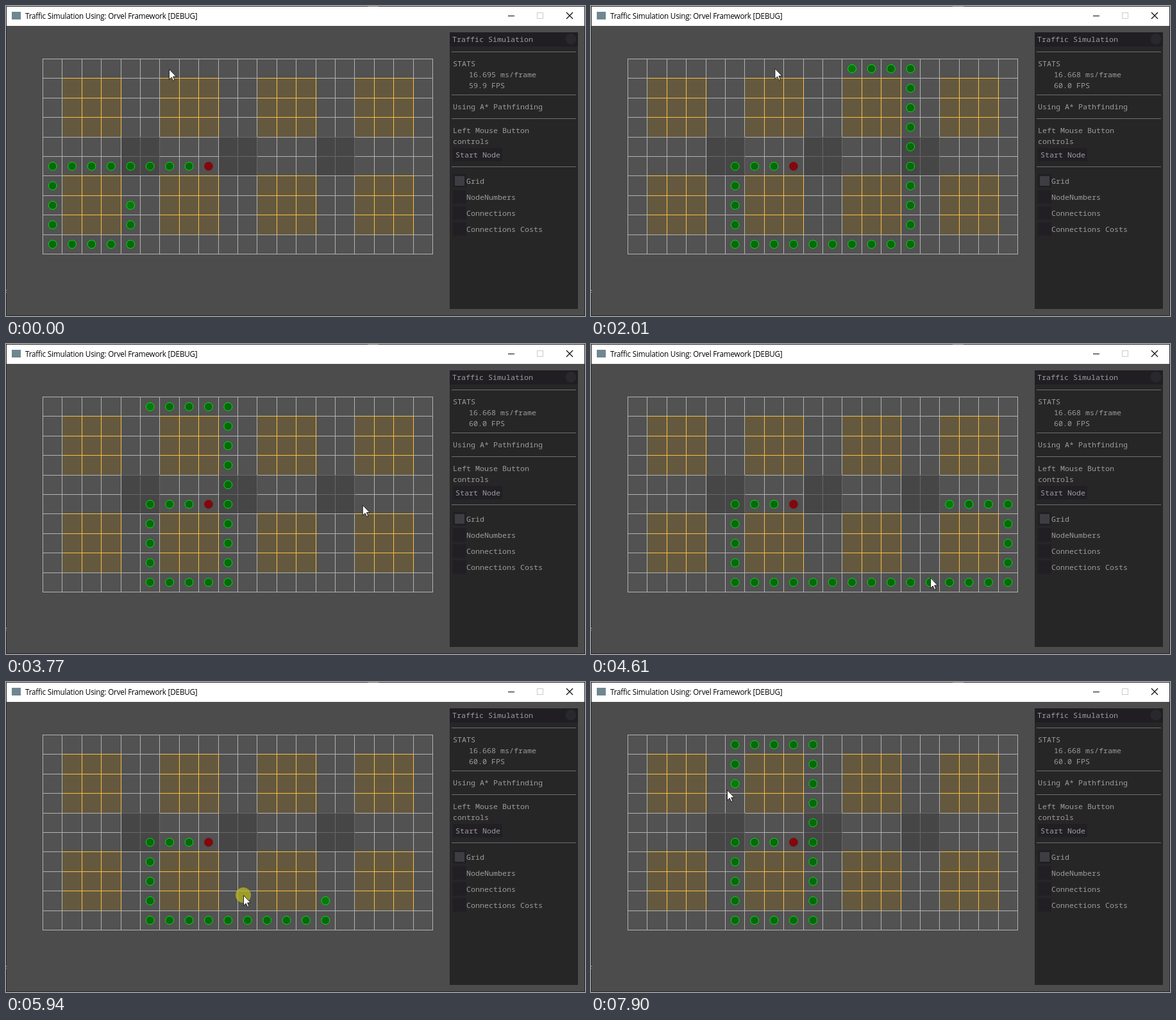
An HTML page that plays this animation: 903x483 px, repeating every 7970 ms.

```html
<!DOCTYPE html>
<html lang="en">
<head>
<meta charset="utf-8">
<title>Traffic Simulation</title>
<style>
  html, body { margin: 0; width: 100%; height: 100%; overflow: hidden; background: #4c4c4c; }
  svg { display: block; }
  .title { font: 11.7px "Open Sans", "Noto Sans", sans-serif; fill: #000; letter-spacing: -0.2px; }
  .ui { font: 11.67px "Noto Sans Mono", "DejaVu Sans Mono", monospace; fill: #9c9c9c; white-space: pre; }
  .crisp { shape-rendering: crispEdges; }
</style>
</head>
<body>
<svg id="stage" width="903" height="483" viewBox="0 0 903 483"></svg>
<script>
const LOOP = 7970, COLS = 20, ROWS = 10;
const PITCH = 30.4, LEFT = 57.5, TOP = 82.5;
const stage = document.getElementById('stage');

function add(tag, attrs, parent = stage) {
  const el = document.createElementNS('http://www.w3.org/2000/svg', tag);
  for (const key in attrs) el.setAttribute(key, attrs[key]);
  return parent.appendChild(el);
}
const box = (x, y, width, height, fill) => add('rect', { x, y, width, height, fill, class: 'crisp' });
function label(x, y, text, cls = 'ui') {
  const el = add('text', { x, y, class: cls });
  el.textContent = text;
  return el;
}
const show = (el, on) => el.setAttribute('visibility', on ? 'visible' : 'hidden');

function drawWindow() {
  box(0, 0, 903, 483, '#4c4c4c');
  box(0, 0, 903, 31, '#ffffff');
  box(0, 0, 903, 1, '#2a2a2a');
  box(564, 0, 17, 1, '#6a6250');
  box(0, 0, 1, 483, '#272727');
  box(902, 0, 1, 483, '#272727');
  box(0, 482, 903, 1, '#272727');
  box(0, 442, 1, 2, '#8c8c8c');
  box(0, 446, 1, 1, '#8c8c8c');
  box(9, 9, 14, 12, '#6f8790');
  label(30, 20, 'Traffic Simulation Using: Orvel Framework [DEBUG]', 'title');
  box(783, 15, 10, 1, '#000');
  add('rect', { x: 828.5, y: 10.5, width: 9, height: 9, fill: 'none', stroke: '#cccccc' });
  add('path', { d: 'M874 10l10 10m0-10l-10 10', stroke: '#000', 'stroke-width': 1.1 });
}

const KINDS = {
  road: ['#515251', '#b2b2b2'],
  block: ['#64593f', '#fabd48'],
  crossing: ['#464646', '#686868']
};
function kind(c, r) {
  if (c % 5 > 0 && c % 5 < 4 && r % 5 > 0 && r % 5 < 4) return 'block';
  return (r === 4 || r === 5) && c > 3 && c < 16 && c % 5 % 4 === 0 ? 'crossing' : 'road';
}

// Later cells cover the shared edges, so rows run down and columns run leftwards.
function drawGrid() {
  const lineX = c => Math.floor(LEFT + PITCH * c);
  const lineY = r => Math.floor(TOP + PITCH * r);
  for (let r = 0; r < ROWS; r++) {
    for (let c = COLS - 1; c >= 0; c--) {
      const x = lineX(c), y = lineY(r), [fill, stroke] = KINDS[kind(c, r)];
      add('rect', {
        x: x + .5, y: y + .5, width: lineX(c + 1) - x, height: lineY(r + 1) - y,
        fill, stroke, class: 'crisp'
      });
    }
  }
}

function drawPanel() {
  box(692, 41, 200, 431, '#262627');
  box(692, 41, 200, 22, '#201e23');
  add('circle', { cx: 881, cy: 51.5, r: 8.5, fill: '#29282c' });
  for (const y of [71, 138, 175, 250]) box(695, y, 194, 1, '#6e6e72');
  label(696, 56, 'Traffic Simulation');
  label(697, 94, 'STATS');
  label(697, 161, 'Using A* Pathfinding');
  label(697, 198, 'Left Mouse Button');
  label(697, 215, 'controls');
  box(697, 221, 77, 21, '#211f24');
  label(701, 236, 'Start Node');
  ['Grid', 'NodeNumbers', 'Connections', 'Connections Costs'].forEach((name, i) => {
    box(697, 262 + 25 * i, 21, 21, '#211f24');
    label(718, 277 + 25 * i, name);
  });
  box(700, 265, 15, 15, '#3e3d43');
}

// One-way lanes: every fifth column runs up, the one before it down;
// traffic circles clockwise until it reaches the goal in row 5.
function route(c, r) {
  const nodes = [[c, r]];
  function go(toC, toR) {
    while (c !== toC || r !== toR) {
      c += Math.sign(toC - c);
      r += Math.sign(toR - r);
      nodes.push([c, r]);
    }
  }
  const upLane = c % 5 === 0;
  if (!(upLane && c <= 5 && r > 5)) {
    if (upLane) go(c, r > 5 ? 5 : 0);
    go(c + 4 - c % 5, r);
    go(c, 9);
    go(c > 5 ? 5 : 0, 9);
  }
  go(c, 5);
  go(8, 5);
  return nodes;
}

function drawRoute(x, y) {
  const group = add('g', {});
  const nodes = route(Math.floor((x - LEFT) / PITCH), Math.floor((y - TOP) / PITCH));
  nodes.forEach(([c, r], i) => {
    const goal = i === nodes.length - 1;
    add('circle', {
      cx: LEFT + PITCH * (c + .5), cy: TOP + PITCH * (r + .5), r: 6.4,
      fill: goal ? '#82080c' : i ? '#066a0c' : '#087a0d',
      stroke: goal ? '#82080c' : '#08d813'
    }, group);
  });
  return group;
}

// Where the pointer rests; a click there sets the start node
const stop = (t, x, y) => ({ t, x, y });
const click = (t, x, y) => ({ t, x, y, click: true });
const STOPS = [
  click(-400, 194, 310), stop(0, 254, 98),
  click(760, 408, 98), stop(1180, 507, 86),
  click(2400, 226, 100), stop(2850, 420, 223),
  click(3900, 558, 251), stop(4610, 529, 364),
  click(5100, 500, 342), click(6000, 370, 332),
  click(6500, 74, 312), stop(6640, 77, 316),
  click(7760, 212, 168), stop(LOOP, 212, 168)
];
const REST = 60;

function pointerAt(t) {
  const i = STOPS.findIndex(s => s.t > t);
  const a = STOPS[i - 1], b = STOPS[i];
  const u = Math.min(1, Math.max(0, (t - a.t - REST) / (b.t - a.t - 2 * REST)));
  const k = u * u * (3 - 2 * u);
  return [a.x + (b.x - a.x) * k, a.y + (b.y - a.y) * k];
}

drawWindow();
drawGrid();
drawPanel();
const frameTime = label(722, 111, '');
const fps = label(722, 128, '');
const clicks = STOPS.filter(s => s.click);
const routes = clicks.map(s => drawRoute(s.x, s.y));
const pointer = add('g', {});
const halo = add('circle', { r: 12, fill: '#b9b71e', 'fill-opacity': .75 }, pointer);
add('path', {
  d: 'M.5 .5V16.5L4.2 13L6.8 18.5L9 17.5L6.6 12H11.5Z',
  fill: '#fff', stroke: '#111', 'stroke-width': .9
}, pointer);

function draw() {
  const t = performance.now() % LOOP;
  const [x, y] = pointerAt(t);
  pointer.setAttribute('transform', `translate(${x.toFixed(1)} ${y.toFixed(1)})`);
  show(halo, clicks.some(s => Math.abs(t - s.t) < REST + 10));

  const active = clicks.filter(s => s.t <= t).length - 1;
  routes.forEach((group, i) => show(group, i === active));

  const ms = 16.668 + .027 * Math.exp(-t / 300);
  frameTime.textContent = ms.toFixed(3) + ' ms/frame';
  fps.textContent = (1000 / ms).toFixed(1) + ' FPS';
  requestAnimationFrame(draw);
}
draw();
</script>
</body>
</html>
```
